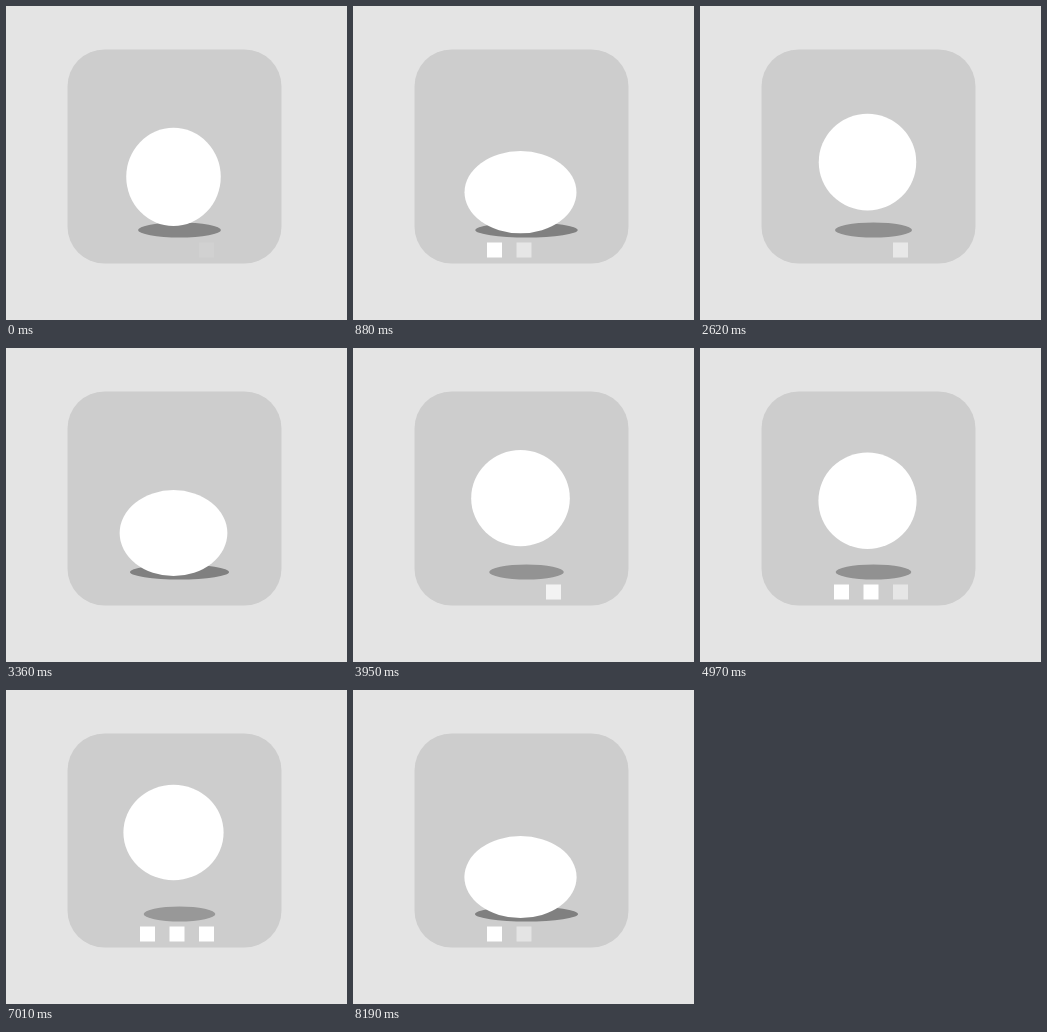
Recreate the animation shown at these times as an HTML page. Size 341x314 px, loop 8270 ms.

```html
<!DOCTYPE html>
<html lang="en">
<head>
<meta charset="utf-8">
<title>Bouncing loader</title>
<style>
  html, body { margin: 0; width: 100%; height: 100%; overflow: hidden; background: #e4e4e4; }
  svg { display: block; width: 100%; height: 100%; }
</style>
</head>
<body>
<svg viewBox="0 0 341 314">
  <rect x="61.5" y="43.5" width="214" height="214" rx="37" fill="#cdcdcd"/>
  <ellipse id="shadow" cx="173.5" cy="224" ry="7.5"/>
  <g fill="#fff">
    <ellipse id="ball" cx="167.5"/>
    <rect class="dot" x="134" y="236.5" width="15" height="15"/>
    <rect class="dot" x="163.5" y="236.5" width="15" height="15"/>
    <rect class="dot" x="193" y="236.5" width="15" height="15"/>
  </g>
</svg>
<script>
// Times in ms; a bounce is counted from the moment of landing.
const LOOP = 8270, STEPS = 57, STEP = 146.25, EARLY = 20;
const BOUNCE = 665, LEAVE = 198, APEX = 478, SQUASH = 300, FIRST_LANDING = 12;
const TOP = 175.5, GROUND = 228;

const ball = document.getElementById('ball');
const shadow = document.getElementById('shadow');
const dots = document.querySelectorAll('.dot');

const ramp = (t, start, length) => Math.min(1, Math.max(0, (t - start) / length));

function set(el, attrs) {
  for (const name in attrs) el.setAttribute(name, attrs[name]);
}

// 1 on the ground, 0 at the top
function nearness(t) {
  return t < APEX
    ? (1 - ramp(t, LEAVE, APEX - LEAVE)) ** 1.5
    : ramp(t, APEX, BOUNCE - APEX) ** 2.5;
}

function draw(now) {
  // The picture is held for one step at a time.
  const step = Math.min(STEPS - 1, Math.floor((now % LOOP + EARLY) / STEP));
  const t = (step * STEP - FIRST_LANDING + BOUNCE) % BOUNCE;
  const near = nearness(t);
  const squash = Math.sin(Math.PI * ramp(t, 0, SQUASH) ** 0.7);

  const width = 103 - 10 * near + 27 * squash;
  const height = 94 + 5 * near - 24 * squash;
  const bottom = TOP + (GROUND - TOP) * near;
  set(ball, { cy: bottom - height / 2, rx: width / 2, ry: height / 2 });

  const grey = Math.round(161 - 33 * near);
  set(shadow, { rx: 33 + 10 * near + 12 * squash, fill: `rgb(${grey},${grey},${grey})` });

  dots.forEach((dot, i) => {
    const shown = ramp(t, 70 + 105 * i, 50);
    const gone = ramp(t, 372 + 113 * i, 60);
    set(dot, { opacity: shown * (1 - gone) });
  });
}

const start = performance.now();
function tick() {
  draw(performance.now() - start);
  requestAnimationFrame(tick);
}
tick();
</script>
</body>
</html>
```
